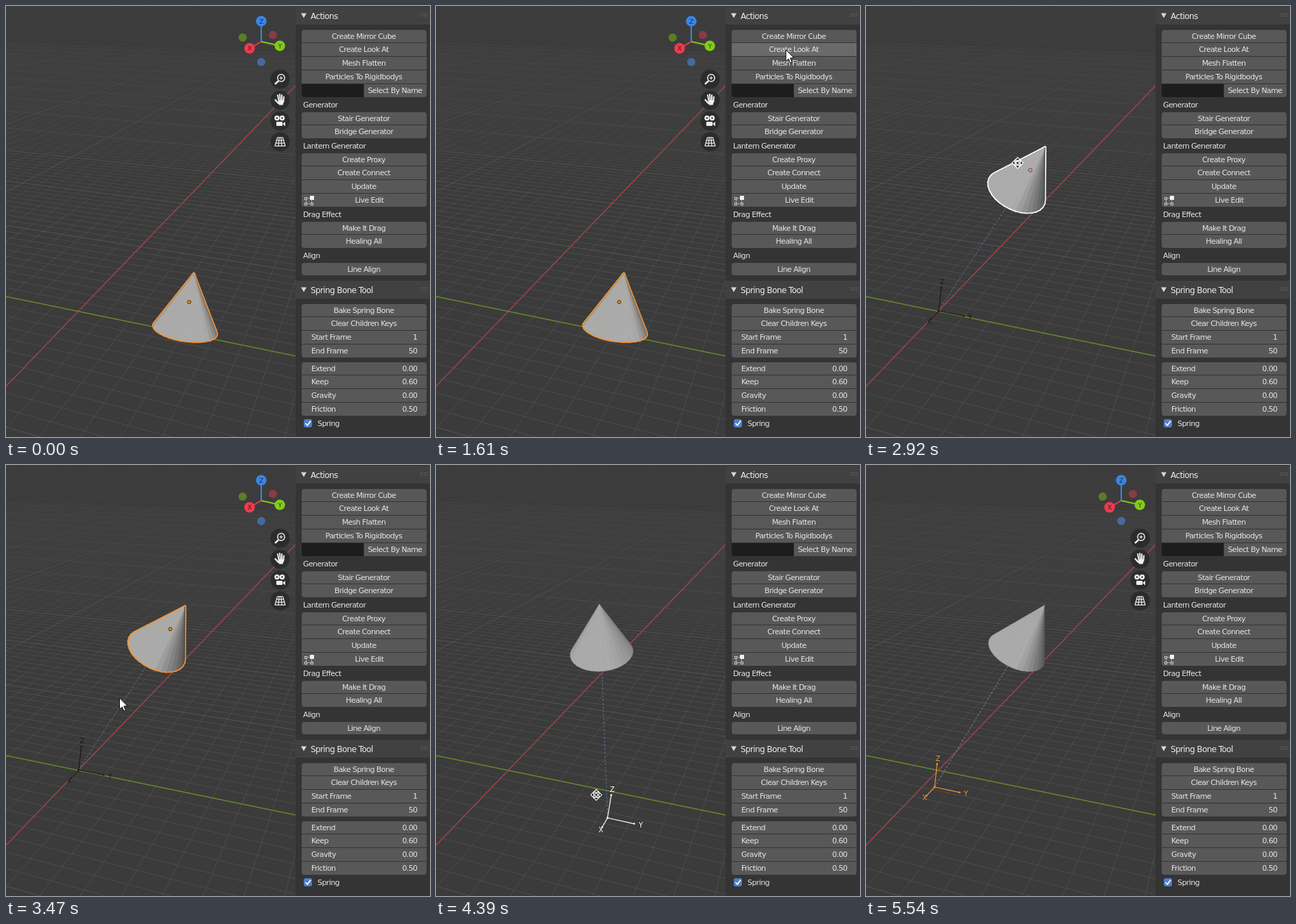
An HTML page with a canvas that plays this animation: 618 by 629 pixels, repeating every 7.48 s.

```html
<!DOCTYPE html>
<html lang="en">
<head>
<meta charset="utf-8">
<title>Look-at cone</title>
<style>
html, body { margin: 0; width: 618px; height: 629px; overflow: hidden; background: #3b3b3b; }
canvas { display: block; }
</style>
</head>
<body>
<canvas id="stage" width="618" height="629"></canvas>
<script>
const g = document.getElementById('stage').getContext('2d');
const LOOP = 7480, TICK = 76.94;
const ORANGE = '#f5922f', WHITE = '#ffffff', ICON = '#eeeeee', DARK = '#2c2c2c';

// ---- motion: key points [tick, x, y], eased from one to the next ----
const MOUSE = [[2, 470, 600], [6, 276, 423], [8, 276, 423], [14, 480, 145], [18, 505, 89], [21, 510, 64],
  [22, 510, 64], [29, 249, 422], [30, 249, 422], [40, 221, 228], [50, 110, 452], [70, 103, 462], [71, 283, 570]];
const CONE = [[30, 267, 432], [38, 239.5, 239.5]];
const EMPTY = [[50, 106, 445], [52, 256, 495], [53, 342, 500], [57, 250, 515], [62, 92, 192],
  [63, 95, 184], [66, 72, 300], [70, 100, 470]];

function along(keys, k) {
  const i = keys.findIndex(p => p[0] > k);
  if (i <= 0) return (i ? keys[keys.length - 1] : keys[0]).slice(1);
  const [a, b] = [keys[i - 1], keys[i]];
  const u = (k - a[0]) / (b[0] - a[0]), ease = u * u * (3 - 2 * u);
  return [1, 2].map(j => a[j] + (b[j] - a[j]) * ease);
}

// ---- camera space: x right, y up, z away from the viewer ----
const F = 1168, CX = -223, CY = 420, FAR = 32, NEAR = 26;
const AX = [-0.532, -0.305, -0.79], AY = [0.847, -0.19, -0.496], AZ = [0, 0.933, -0.36];
const AXES = [['X', AX, '#ee3b50', '#873c47'], ['Y', AY, '#83cb17', '#5b7d25'], ['Z', AZ, '#3a86e8', '#436a9f']];
const unproject = (x, y, z) => [(x - CX) * z / F, (CY - y) * z / F, z];
const project = p => [CX + F * p[0] / p[2], CY - F * p[1] / p[2]];
const add = (a, b, k = 1) => a.map((v, i) => v + b[i] * k);
const scale = (a, k) => a.map(v => v * k);
const dot = (a, b) => a[0] * b[0] + a[1] * b[1] + a[2] * b[2];
const norm = a => scale(a, 1 / Math.sqrt(dot(a, a)));
const cross = (a, b) => [a[1] * b[2] - a[2] * b[1], a[2] * b[0] - a[0] * b[2], a[0] * b[1] - a[1] * b[0]];
const ORIGIN = unproject(105.5, 445.5, FAR);
const ground = (x, y) => project(add(add(ORIGIN, AX, x), AY, y));

// ---- drawing helpers ----
function paint(fill, stroke, width) {
  if (fill) { g.fillStyle = fill; g.fill(); }
  if (stroke) { g.strokeStyle = stroke; g.lineWidth = width; g.stroke(); }
}
function poly(pts, fill, stroke, width = 1) {
  g.beginPath();
  pts.forEach(p => g.lineTo(p[0], p[1]));
  g.closePath();
  paint(fill, stroke, width);
}
function line(pts, color, width) {
  g.beginPath();
  pts.forEach(p => g.lineTo(p[0], p[1]));
  paint(null, color, width);
}
function disc(x, y, r, fill, stroke, width = 1) {
  g.beginPath();
  g.arc(x, y, r, 0, 7);
  paint(fill, stroke, width);
}
function box(x, y, w, h, r, fill) {
  g.beginPath();
  g.roundRect(x, y, w, h, r);
  paint(fill);
}
function text(s, x, y, align = 'left', size = 11, color = '#e6e6e6') {
  g.font = size + 'px "DejaVu Sans", sans-serif';
  g.letterSpacing = '-0.6px';
  g.textAlign = align;
  g.fillStyle = color;
  g.fillText(s, x, y + size * 0.365);
}

// ---- viewport ----
function gridLines(step, reach, top, bottom, alpha) {
  const fade = g.createLinearGradient(0, top, 0, bottom);
  fade.addColorStop(0, 'rgba(100,100,100,0)');
  fade.addColorStop(1, `rgba(100,100,100,${alpha})`);
  for (let k = -reach; k <= reach; k += step) {
    if (!k) continue;
    const x = (30 + AY[2] * k) / -AX[2], y = (30 + AX[2] * k) / -AY[2];
    line([ground(-reach, k), ground(x, k)], fade, 1);
    line([ground(k, -reach), ground(k, y)], fade, 1);
  }
}
function floor() {
  g.fillStyle = '#3b3b3b';
  g.fillRect(0, 0, 422, 629);
  gridLines(1, 150, 40, 330, 0.38);
  gridLines(10, 600, -10, 200, 0.3);
  line([[0, 555], [440, 97.4]], '#a2434d', 1.5);
  line([[0, 424], [440, 514.6]], '#64892a', 1.5);
}

const LIGHT = [-0.45, 0.5, -0.74], SIDES = 32, SIZE = 0.97;
function cone(c, axis, outline) {
  const p = norm(cross(axis, [0.3, 0.2, 1])), q = cross(axis, p);
  const radial = i => {
    const a = i * 2 * Math.PI / SIDES;
    return add(scale(p, Math.cos(a)), q, Math.sin(a));
  };
  const foot = add(c, axis, -SIZE), tip = add(c, axis, SIZE);
  const rim = i => project(add(foot, radial(i), SIZE));
  const faces = [];
  if (dot(axis, foot) > 0) faces.push([Array.from({ length: SIDES }, (_, i) => rim(i)), scale(axis, -1)]);
  for (let i = 0; i < SIDES; i++) {
    const n = add(scale(axis, 0.447), radial(i + 0.5), 0.894);
    if (dot(n, tip) < 0) faces.push([[project(tip), rim(i), rim(i + 1)], n]);
  }
  g.lineJoin = 'round';
  if (outline) for (const [pts] of faces) poly(pts, null, outline, 4);
  for (const [pts, n] of faces) {
    const v = Math.round(Math.min(170, Math.max(66, 90 + 130 * dot(n, LIGHT))));
    const color = `rgb(${v},${v + 1},${v})`;
    poly(pts, color, color, 0.7);
  }
}

function empty(e, color) {
  const o = project(e);
  for (const [name, dir] of AXES) {
    const end = project(add(e, dir)), label = project(add(e, dir, 1.24));
    line([o, end], color, 1.2);
    disc(...end, 1.3, color);
    text(name, ...label, 'center', 10, color);
  }
  disc(...o, 1.5, color);
}

function gizmo() {
  const end = (dir, k) => [372 + dir[0] * k, 52 - dir[1] * k];
  for (const [, dir, , dim] of AXES) disc(...end(dir, -32), 6, dim);
  for (const [name, dir, color] of AXES) {
    line([end(dir, 0), end(dir, 32)], color, 2);
    disc(...end(dir, 32), 7.7, color);
    text(name, ...end(dir, 32), 'center', 9.5, 'rgba(0,0,0,.65)');
  }
  for (let i = 0; i < 4; i++) disc(399.5, 107 + i * 30.4, 14, DARK);
  // zoom
  line([[392, 114], [397, 109.5]], ICON, 2.4);
  disc(401, 105, 5.2, null, ICON, 1.5);
  line([[398.5, 105], [403.5, 105]], ICON, 1.2);
  line([[401, 102.5], [401, 107.5]], ICON, 1.2);
  // hand
  g.lineCap = 'round';
  for (let i = 0; i < 4; i++) line([[396 + i * 3, 129 + (i - 1) ** 2 * 0.9], [398 + i * 2.1, 140]], ICON, 2);
  line([[392.5, 137], [397, 142]], ICON, 2.2);
  g.lineCap = 'butt';
  poly([[396.5, 138], [405.5, 137.5], [403.5, 144.5], [398, 144.5]], ICON);
  // camera
  for (const x of [395, 402.5]) {
    disc(x, 163.5, 3.7, ICON);
    disc(x, 163.5, 1.2, DARK);
  }
  box(394, 169, 9, 6, 1, ICON);
  poly([[403, 172], [407, 169], [407, 175.5]], ICON);
  // perspective grid
  for (let i = 0; i < 4; i++) {
    const y = 192 + i * 4.1, w = 4 + i * 1.2;
    line([[399.5 - w, y], [399.5 + w, y]], ICON, 1.2);
    line([[395.5 + i * 2.67, 192], [392 + i * 5, 204.5]], ICON, 1.2);
  }
}

// ---- side panel: a list of blocks laid out on a 20 px pitch ----
const BLOCKS = [
  { header: 'Actions', rows: ['Create Mirror Cube', 'Create Look At', 'Mesh Flatten', 'Particles To Rigidbodys', 'Select By Name'] },
  { label: 'Generator', rows: ['Stair Generator', 'Bridge Generator'] },
  { label: 'Lantern Generator', rows: ['Create Proxy', 'Create Connect', 'Update', 'Live Edit'] },
  { label: 'Drag Effect', rows: ['Make It Drag', 'Healing All'] },
  { label: 'Align', rows: ['Line Align'] },
  { header: 'Spring Bone Tool', rows: ['Bake Spring Bone', 'Clear Children Keys', 'Start Frame:1', 'End Frame:50'] },
  { gap: 5, rows: ['Extend:0.00', 'Keep:0.60', 'Gravity:0.00', 'Friction:0.50'] }
];

function header(y, title) {
  g.fillStyle = '#414141';
  g.fillRect(422, y - 13, 196, 26);
  poly([[430, y - 3.5], [438, y - 3.5], [434, y + 3.5]], '#d8d8d8');
  text(title, 444, y + 0.5, 'left', 12, '#ededed');
  g.fillStyle = '#858585';
  for (let i = 0; i < 8; i++) g.fillRect(604 + (i % 4) * 3, y - 3 + (i >> 2) * 3, 1, 1);
}

function row(s, y, first, last, mouse) {
  const top = y - 9, h = last ? 18 + !first : 18 + !first * 1;
  const named = s === 'Select By Name', x = named ? 522 : 431;
  const over = mouse && mouse[0] >= x && mouse[0] < 613 && mouse[1] >= top && mouse[1] < top + h;
  const a = first ? 4 : 0, b = last ? 4 : 0;
  if (named) box(431, top, 90, h, [0, 0, 0, 4], '#1d1d1d');
  box(x, top, 613 - x, h, [a, a, b, named ? 0 : b], over ? '#6a6a6a' : '#585858');
  const [name, value] = s.split(':');
  if (value) {
    text(name, 445, y);
    text(value, 599.5, y, 'right');
  } else text(name, named ? 567 : s === 'Live Edit' ? 529.5 : 521.5, y, 'center');
  if (s === 'Live Edit') editIcon(y);
}

function editIcon(y) {
  g.strokeStyle = '#a8a8a8';
  g.lineWidth = 1;
  g.strokeRect(437.5, y - 2.5, 8, 8);
  for (const [dx, dy] of [[0, 0], [0, 8], [9, 8]]) {
    box(435 + dx, y - 4 + dy, 4, 4, 0, '#c8c8c8');
    box(436 + dx, y - 3 + dy, 2, 2, 0, '#585858');
  }
  box(443, y - 6, 6, 6, 0, '#f0f0f0');
}

function panel(mouse) {
  g.fillStyle = '#343434';
  g.fillRect(422, 0, 196, 629);
  let y = 4;
  for (const block of BLOCKS) {
    if (block.header) {
      header(y + 10, block.header);
      y += 40;
    }
    if (block.label) {
      text(block.label, 433, y);
      y += 20;
    }
    y += block.gap || 0;
    block.rows.forEach((s, i) => {
      row(s, y - (i > 0), i === 0, i === block.rows.length - 1, mouse);
      y += 20;
    });
  }
  box(434, y - 6, 12, 12, 3, '#4f7fc6');
  line([[436.5, y], [439.3, y + 3], [444, y - 3.5]], WHITE, 1.8);
  text('Spring', 454, y);
}

// ---- pointers ----
function arrow(x, y) {
  const pts = [[0, 0], [0, 16.5], [3.8, 13], [6.3, 19], [8.8, 18], [6.3, 12], [11.5, 11.7]];
  poly(pts.map(p => [p[0] + x, p[1] + y]), WHITE, '#111', 1);
}
function mover(x, y) {
  g.save();
  g.translate(x, y);
  for (let i = 0; i < 4; i++) {
    poly([[-4, -4], [0, -8], [4, -4]], '#111', WHITE, 1.2);
    g.rotate(Math.PI / 2);
  }
  disc(0, 0, 2.2, '#222', WHITE, 1.2);
  g.restore();
}

function draw(time) {
  const k = Math.floor(time % LOOP / TICK + 0.2);
  const moveCone = k > 30 && k < 40, moveEmpty = k > 50 && k < 70, grab = moveCone || moveEmpty;
  const linked = k > 22, picked = k > 47;
  const at = along(CONE, k), spot = along(EMPTY, k);
  const c = unproject(...at, NEAR), e = unproject(...spot, FAR);
  const mouse = k < 2 || k > 71 ? null
    : moveCone ? [at[0] - 18.5, at[1] - 10.5]
    : along(moveEmpty ? EMPTY : MOUSE, k + moveEmpty);

  floor();
  if (linked) {
    g.setLineDash([3, 2.5]);
    line([spot, at], picked && !grab ? '#8c8c8c' : '#5878a2', 1);
    g.setLineDash([]);
    empty(e, !picked ? '#191919' : moveEmpty ? WHITE : ORANGE);
  }
  cone(c, linked ? norm(add(c, e, -1)) : AZ, picked ? null : moveCone ? WHITE : ORANGE);
  if (moveCone) disc(...at, 2.5, null, '#a04444', 1.1);
  else if (!picked) disc(...at, 2.5, '#e08a28', '#4a2c0c');
  if (!grab) gizmo();
  panel(mouse);
  if (mouse) (grab ? mover : arrow)(...mouse);
}

const start = performance.now();
function tick() {
  draw(performance.now() - start);
  requestAnimationFrame(tick);
}
tick();
</script>
</body>
</html>
```
